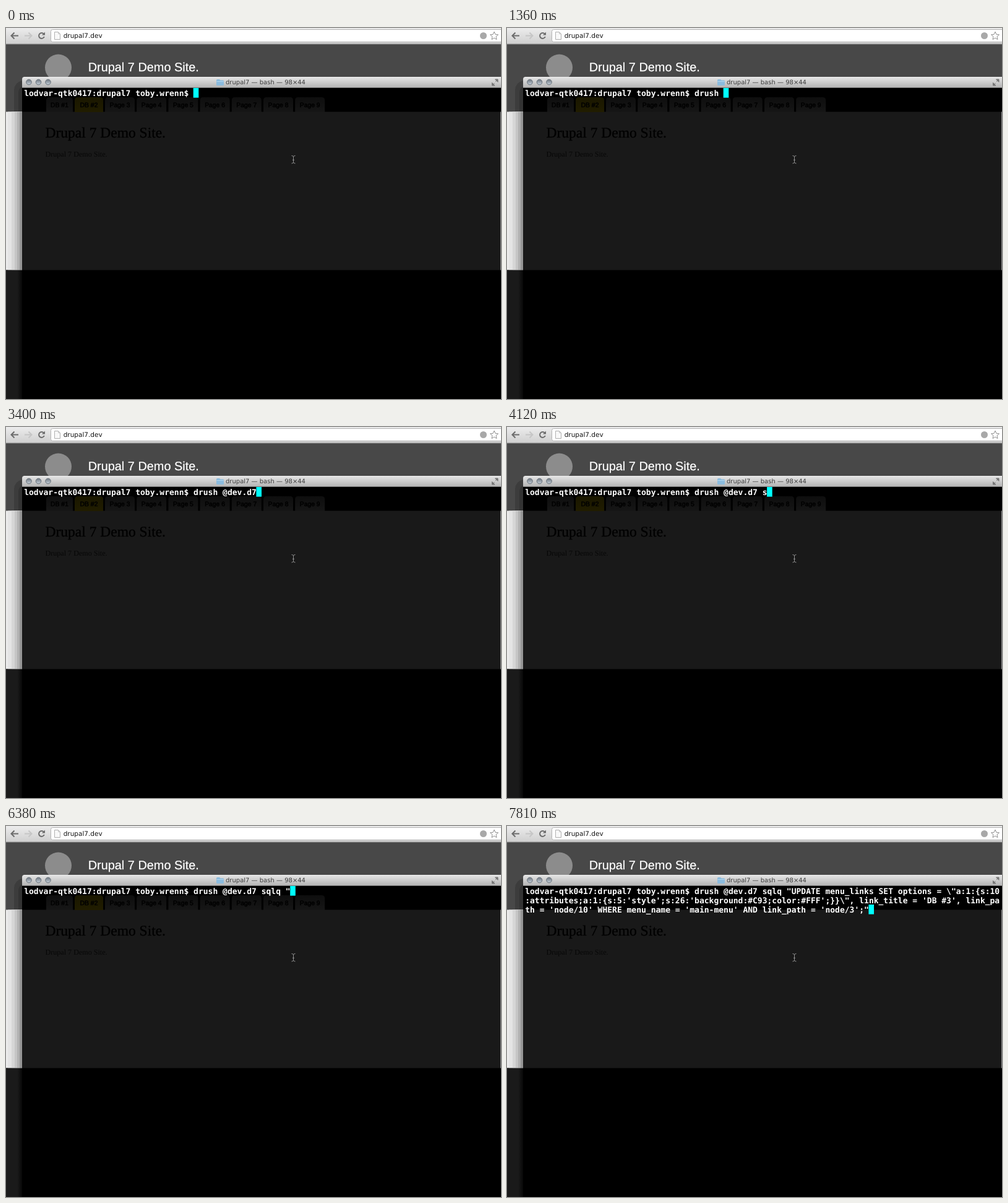
Animation, 800 px wide and 600 px high, one loop 8000 ms. Source, as an HTML page:

```html
<!DOCTYPE html>
<html lang="en">
<head>
<meta charset="utf-8">
<title>Terminal over browser</title>
<style>
  html, body { margin: 0; width: 100%; height: 100%; overflow: hidden; background: #000; }
  svg { display: block; width: 800px; height: 600px; }
  text { white-space: pre; text-rendering: geometricPrecision; }
  .ui { font-family: "DejaVu Sans", sans-serif; }
  .sans { font-family: "Liberation Sans", Arial, sans-serif; }
  .serif { font-family: "Liberation Serif", Georgia, serif; }
  .term { font: bold 13px "DejaVu Sans Mono", monospace; fill: #fff; }
</style>
</head>
<body>
<svg viewBox="0 0 800 600">
  <defs>
    <linearGradient id="toolbar" x2="0" y2="1">
      <stop stop-color="#ececec"/><stop offset="1" stop-color="#cfcfcf"/>
    </linearGradient>
    <linearGradient id="bar" x2="0" y2="1">
      <stop stop-color="#e6e6e6"/><stop offset="1" stop-color="#b2b2b2"/>
    </linearGradient>
    <linearGradient id="light" x2="0" y2="1">
      <stop stop-color="#6f7780"/><stop offset="1" stop-color="#c3ced8"/>
    </linearGradient>
    <linearGradient id="tab" x2="0" y2="1">
      <stop stop-color="#0e0e0e"/><stop offset="1" stop-color="#161616"/>
    </linearGradient>
    <linearGradient id="gold" x2="0" y2="1">
      <stop stop-color="#1a1700"/><stop offset="1" stop-color="#211d00"/>
    </linearGradient>
    <linearGradient id="dusk">
      <stop offset=".7" stop-color="#1a1a1a"/><stop offset="1" stop-color="#080808"/>
    </linearGradient>
  </defs>

  <!-- web page -->
  <rect y="26" width="800" height="110" fill="#484848"/>
  <path d="M13 136V100Q14 88 26 85V136Z" fill="#3c3c3c"/>
  <path d="M20 136V104Q21 97 26 94V136Z" fill="#333"/>
  <g id="shade"></g>
  <rect y="391.500" width="26" height="208.500" fill="url(#dusk)"/>
  <circle cx="84.500" cy="64" r="21.500" fill="#8c8c8c"/>
  <text class="sans" x="132.700" y="70" font-size="19.900" fill="#fff" stroke="#fff" stroke-width=".25">Drupal 7 Demo Site.</text>

  <!-- browser toolbar -->
  <rect width="800" height="26" fill="url(#toolbar)"/>
  <rect y="25.500" width="800" height="1" fill="#8f8f8f"/>
  <rect x="72.500" y="2.500" width="740" height="20" rx="3" fill="#fff" stroke="#b4b4b4"/>
  <g fill="none" stroke-width="2">
    <path d="M20 12.500H9M13.500 7.500L8.500 12.500L13.500 17.500" stroke="#6c6c6c"/>
    <path d="M30 12.500H41M36.500 7.500L41.500 12.500L36.500 17.500" stroke="#c6c6c6"/>
    <path d="M61 9.500A4.500 4.500 0 1 0 61.800 14" stroke="#6c6c6c"/>
  </g>
  <path d="M63 6.500V11.500H58Z" fill="#6c6c6c"/>
  <path d="M78.500 6.500H84.500L87.500 9.500V18.500H78.500Z" fill="#f8f8f8" stroke="#b0b0b0"/>
  <path d="M84.500 6.500V9.500H87.500" fill="none" stroke="#c4c4c4"/>
  <text class="ui" x="92.700" y="16.300" font-size="10.500" fill="#111">drupal7.dev</text>
  <circle cx="771.500" cy="12.500" r="5.500" fill="#a8a8a8"/>
  <path d="M789 6L790.900 10.300L795.500 10.800L792 13.900L793 18.500L789 16.100L785 18.500L786 13.900L782.500 10.800L787.100 10.300Z" fill="#fff" stroke="#909090"/>

  <!-- terminal window -->
  <rect x="26" y="96" width="774" height="504" fill="#000"/>
  <rect x="26" y="135.500" width="774" height="256" fill="#191919"/>
  <rect x="799" y="135.500" width="1" height="256" fill="#8c8c8c"/>
  <path d="M26 97V83Q26 79 30 79H800V97Z" fill="url(#bar)"/>
  <path d="M29 79.500H800" stroke="#ededed"/>
  <path d="M26 96.500H800" stroke="#777"/>
  <g id="lights" fill="url(#light)" stroke="#68717a"></g>
  <path d="M340 84.500Q340 83 341.500 83H345L346.500 84.500H351Q352 84.500 352 86V92Q352 93 351 93H341Q340 93 340 92Z" fill="#8bbbdd"/>
  <path d="M340.500 86.500H351.500" stroke="#b5d8ee"/>
  <text class="ui" x="355" y="91.300" font-size="10" fill="#3c3c3c">drupal7 — bash — 98×44</text>
  <path d="M790.500 83H795V87.500ZM785.500 88.500V93H790ZM791 87L794 84M786.500 92L789.500 89" fill="#777" stroke="#777"/>
  <g id="tabs" class="sans" font-size="10.400" text-anchor="middle"></g>
  <text class="serif" x="63.500" y="177" font-size="23.500" stroke="#000" stroke-width=".3">Drupal 7 Demo Site.</text>
  <text class="serif" x="63.500" y="208" font-size="12.100" opacity=".75">Drupal 7 Demo Site.</text>
  <path d="M461.500 206.500Q464.500 206.500 464.500 208.500Q464.500 206.500 467.500 206.500M464.500 208V218M461.500 219Q464.500 219 464.500 217Q464.500 219 467.500 219M463 213.500H466" fill="none" stroke="#909090"/>
  <rect id="cursor" width="8.600" height="15.700" fill="#0ff"/>
  <g id="lines" class="term"></g>
</svg>
<script>
const $ = id => document.getElementById(id);

function add(parent, tag, attrs, label = "") {
  const el = document.createElementNS("http://www.w3.org/2000/svg", tag);
  for (const key in attrs) el.setAttribute(key, attrs[key]);
  el.textContent = label;
  parent.append(el);
  return el;
}

// window shadow falling on the page, in bands
[[0, "#ebebeb"], [3, "#e4e4e4"], [9, "#d6d6d6"], [14, "#c5c5c5"], [18, "#b2b2b2"], [22, "#969696"]]
  .forEach(([x, fill]) => add($("shade"), "rect", { x, y: 135.5, width: 26 - x, height: 256, fill }));

for (const cx of [37, 52.5, 68]) add($("lights"), "circle", { cx, cy: 87.5, r: 4.3 });

for (let i = 1; i < 10; i++) {
  const x = i === 1 ? 65 : i === 2 ? 111 : 160 + (i - 3) * 51.2;
  const w = i === 1 ? 43 : i === 2 ? 46 : 48;
  add($("tabs"), "path", {
    d: `M${x} 136V117Q${x} 112 ${x + 5} 112H${x + w - 5}Q${x + w} 112 ${x + w} 117V136Z`,
    fill: i === 2 ? "url(#gold)" : "url(#tab)"
  });
  add($("tabs"), "text", { x: x + w / 2, y: 127.5, stroke: "#000", "stroke-width": .5 },
    (i < 3 ? "DB #" : "Page ") + i);
}

const LOOP = 8000, COLS = 98, CELL = 7.826, LEFT = 29.2, ROW = 15;
const prompt = "lodvar-qtk0417:drupal7 toby.wrenn$ ";
const command = "drush @dev.d7 sqlq \"UPDATE menu_links SET options = \\\"a:1:{s:10" +
  ":attributes;a:1:{s:5:'style';s:26:'background:#C93;color:#FFF';}}\\\", link_title = 'DB #3', link_pa" +
  "th = 'node/10' WHERE menu_name = 'main-menu' AND link_path = 'node/3';\"";
const keys = [500, 770, 1010, 1130, 1240, 1360, 1720, 2080, 2200, 2320, 2560, 3040, 3400,
  3880, 4120, 4600, 4830, 5670, 6020, 6380];
const PASTE = 6860, LAST = 7810;

const lines = [0, 1, 2].map(i => add($("lines"), "text", { x: LEFT, y: 109.6 + i * ROW }));
let shown = -1;

function typed(t) {
  if (t >= LAST) return command.length;
  if (t >= PASTE) return command.length - 1;
  return keys.filter(k => k <= t).length;
}

function draw(t) {
  const n = typed(t);
  if (n === shown) return;
  shown = n;
  const all = prompt + command.slice(0, n);
  lines.forEach((line, i) => line.textContent = all.slice(i * COLS, (i + 1) * COLS));
  $("cursor").setAttribute("x", LEFT + all.length % COLS * CELL - .4);
  $("cursor").setAttribute("y", 97 + Math.floor(all.length / COLS) * ROW);
  $("tabs").style.display = t >= PASTE ? "none" : "";
}

const start = performance.now();
function tick() {
  draw((performance.now() - start) % LOOP);
  requestAnimationFrame(tick);
}
tick();
</script>
</body>
</html>
```
